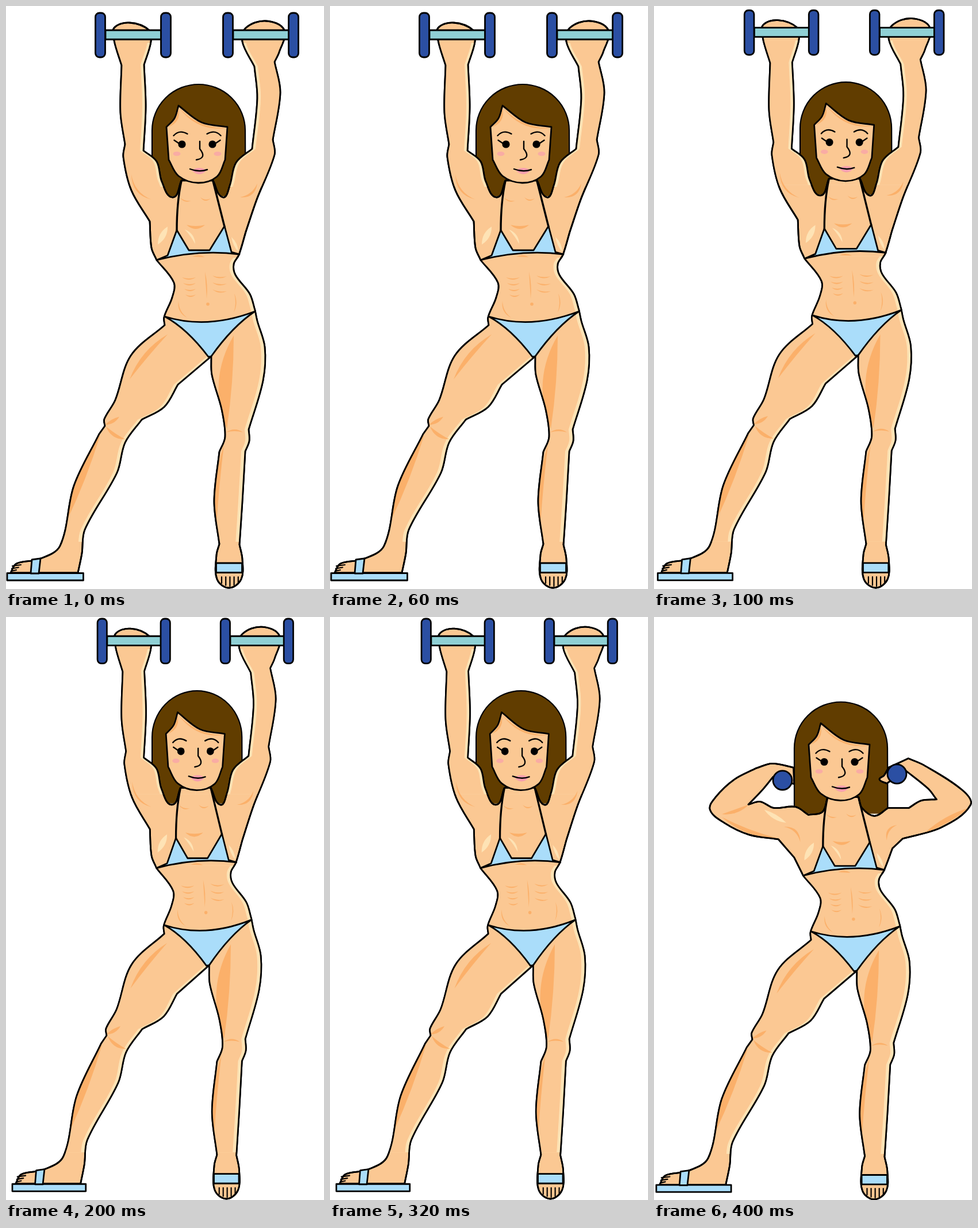
These frames come from a looping animation (553 px wide and 1012 px high, 0.5 s). An HTML page with a canvas:

```html
<!DOCTYPE html>
<html lang="en">
<head>
<meta charset="utf-8">
<title>Dumbbell press</title>
<style>
  html, body { margin: 0; width: 100%; height: 100%; overflow: hidden; background: #fff; }
  canvas { display: block; }
</style>
</head>
<body>
<canvas id="stage" width="553" height="1012"></canvas>
<script>
const c = document.getElementById('stage').getContext('2d');
const SKIN = '#fbc893', SHADE = '#fbb06a', LIGHT = '#fee3b5', HAIR = '#613d00',
      CLOTH = '#aaddfa', STEEL = '#8fd0d5', NAVY = '#2b4fa3', LINE = 2.8;

const unit = (a, b) => {
  const x = b[0] - a[0], y = b[1] - a[1], d = Math.hypot(x, y) || 1;
  return [x / d, y / d];
};

// Smooth curve through "x,y" points; a trailing * marks a corner.
function smooth(text) {
  const path = new Path2D();
  const p = text.split(' ').flatMap(s => {
    const q = s.split(',').map(parseFloat);
    return s.endsWith('*') ? [q, q] : [q];
  });
  path.moveTo(...p[0]);
  for (let i = 1; i < p.length; i++) {
    const a = p[i - 1], b = p[i], h = Math.hypot(b[0] - a[0], b[1] - a[1]) / 3;
    if (!h) continue;
    const u = unit(p[i - 2] || a, b), v = unit(a, p[i + 1] || b);
    path.bezierCurveTo(a[0] + u[0] * h, a[1] + u[1] * h, b[0] - v[0] * h, b[1] - v[1] * h, ...b);
  }
  return path;
}

function paint(path, fill, width = LINE) {
  if (typeof path === 'string') path = new Path2D(path);
  if (fill) { c.fillStyle = fill; c.fill(path); }
  if (width) { c.lineWidth = width; c.stroke(path); }
}

function oval(x, y, rx, ry, fill, width = 0) {
  const path = new Path2D();
  path.ellipse(x, y, rx, ry, 0, 0, 7);
  paint(path, fill, width);
}

function box(x, y, w, h, fill, r = 0) {
  const path = new Path2D();
  path.roundRect(x, y, w, h, r);
  paint(path, fill);
}

// Muscle mark between two points: a lens whose sides bulge by b1 and b2.
function leaf(color, x1, y1, x2, y2, b1, b2) {
  const [ux, uy] = unit([x1, y1], [x2, y2]), mx = (x1 + x2) / 2, my = (y1 + y2) / 2;
  const bend = b => `${mx + 2 * b * uy} ${my - 2 * b * ux}`;
  paint(`M${x1} ${y1}Q${bend(b1)} ${x2} ${y2}Q${bend(b2)} ${x1} ${y1}Z`, color, 0);
}

// Body outline: upper half per pose, then waist and legs back to the start.
const LOWER = ' 405,432 396,448 399,467 424,500 433,528* 437,547 450,592 447,650 422,735* 423,755 416,773* 411,860 406,935* 411,960 409,995 388,1010 367,995 366,953 371,934* 362,860 371,774* 381,748 375,700 358,640 357,608* 299,657* 275,696 236,718* 207,758 193,810 137,909 132,950 125,984* 8,984* 18,968 58,960 94,937 118,833 162,743* 172,729* 171,717 190,684 217,607 276,554* 275,540 289,506 292,480 262,441*';
const RAISED = smooth('262,441* 253,420 250,374* 218,320 204,262 207,240* 199,185 201,103* 188,60 188,38 215,29 249,42 252,62 240,102* 243,175 239,251* 262,270 271,305 290,332 305,303* 360,303* 377,332 389,312 400,272 428,248* 437,160 432,105* 411,62 417,38 452,26 484,42 475,80 467,97* 477,150 464,232* 467,258 436,336 417,392*' + LOWER);
const FLEXED = smooth('262,441* 246,409* 218,377* 166,369 122,348 97,325 107,303 140,272 179,252* 207,244 245,251* 246,280* 209,267* 191,289 165,316* 186,311 210,322 248,320 271,334* 296,329 305,303* 360,303* 366,322 388,336 412,322* 449,322* 471,309 498,307* 483,288 443,256* 410,279* 397,272 405,265 413,251* 448,235* 476,247 544,291 558,317 507,356 438,376* 420,393*' + LOWER);

// Leaves a light rim where the outline, moved sideways, no longer covers itself.
function rim(outline, shift, x, y, w, h) {
  c.save();
  c.beginPath();
  c.rect(x, y, w, h);
  c.clip();
  c.clip(outline);
  paint(outline, LIGHT, 0);
  c.translate(shift, 0);
  paint(outline, SKIN, 0);
  c.restore();
}

function muscles() {
  for (const m of [
    [281, 570, 215, 648, -9, -1], [164, 744, 106, 893, -11, 3],
    [396, 572, 384, 734, -20, 3], [379, 762, 366, 900, -8, -1],
    [172, 727, 197, 713, 2, -4], [174, 730, 207, 752, -1, -7], [383, 740, 412, 740, 5, 2],
    [314, 380, 346, 380, -2, -7], [303, 333, 322, 338, -4, -2], [338, 332, 356, 334, -5, -3],
    [324, 435, 346, 436, 3, 0], [346, 461, 349, 508, 2, 0],
    [300, 512, 315, 541, -6, -4], [397, 499, 396, 532, 4, 2.5]
  ]) leaf(SHADE, ...m);
  for (let i = 0; i < 4; i++) {
    leaf(SHADE, 306 + 2 * i, 471 + 10 * i, 330, 471 + 10 * i, -4, -2);
    if (i < 3) leaf(SHADE, 359, 468 + 12 * i, 384, 469 + 13 * i, -4, -2);
  }
  oval(351, 517.5, 2.8, 2.8, SHADE);
  leaf(LIGHT, 281, 383, 264, 414, -5, 5);
  leaf(LIGHT, 392, 401, 404, 427, 3, -2);
  leaf(LIGHT, 311, 388, 329, 413, 5, 1);
}

function clothes() {
  paint('M276 539Q350 562 433 530Q394 556 357 608L352 609Q315 560 276 539Z', CLOTH);
  paint('M262 441L281 433L297 389L318 424H354L380 382L392 427L406 431Q335 422 262 441Z', CLOTH);
  paint('M297 390Q297 340 305 304M380 383L360 304', null, 3.4);
  box(2, 984.5, 132.5, 12.5, CLOTH);
  paint('M45 961L60 959L57 985H43Z', CLOTH);
  box(365.5, 967, 45, 16.5, CLOTH);
  for (let i = 0; i < 5; i++) {
    paint(`M${375 + 7.2 * i} 991V${1002 + 5 * Math.sin(i * Math.PI / 4)}`, null, 2.2);
    if (i < 3) paint(`M${11 - i} ${972 + 4.5 * i}l${15 - 3 * i} -2`, null, 2.2);
  }
}

function body(outline) {
  paint(outline, SKIN);
  rim(outline, -7, 0, 437, 553, 493);
  if (outline === RAISED) {
    rim(outline, -6, 0, 64, 332, 250);
    rim(outline, 6, 332, 64, 221, 250);
    leaf(SHADE, 218, 292, 253, 336, -11, -8);
    leaf(SHADE, 437, 308, 407, 332, 9, 5);
  } else {
    leaf(LIGHT, 193, 325, 232, 348, 3, -5);
    leaf(SHADE, 118, 333, 166, 316, 0, -6);
    leaf(SHADE, 118, 338, 216, 375, -10, -3);
    leaf(SHADE, 228, 355, 257, 382, 10, 6);
    leaf(SHADE, 428, 352, 410, 379, -9, -5);
    leaf(SHADE, 555, 322, 478, 365, 4, -5);
  }
  muscles();
  paint(outline, null);
  clothes();
}

function hair() {
  const path = new Path2D('M254 330V215');
  path.ellipse(335, 216, 81, 80, 0, Math.PI, 0);
  path.lineTo(416.5, 330);
  paint(path, HAIR, 2.2);
}

function face() {
  paint(smooth('300,173* 293,195 279,210* 283,267* 300,295 334,307 367,296 381,267* 385,210* 340,202 300,173*'), SKIN);
  leaf(SHADE, 301, 177, 384, 212, -10, -13);
  leaf(SHADE, 300, 178, 282, 210, 4, 8);
  for (const side of [-1, 1]) {
    c.save();
    c.translate(332.5, 0);
    c.scale(side, 1);
    oval(26.5, 240, 6.6, 6.6, '#000');
    oval(35.5, 256.5, 6.5, 3.8, '#f9aca4');
    paint('M17 222Q31 214 41 225M40 233L31 239', null, 2.4);
    c.restore();
  }
  paint('M337 235V248Q350 264 331 267', null, 2.4);
  leaf('#f79fae', 323, 285, 349, 285, 4, -7);
  paint('M320 283Q336 289 350 284', null, 2.4);
}

function dumbbells() {
  for (const x of [155.5, 377.5]) {
    box(x + 17.5, 42, 97, 16, STEEL);
    for (const plate of [x, x + 114]) box(plate, 12, 17, 77, NAVY, 7);
  }
}

// k runs from 0 to 1 as the raised figure stretches upwards.
function press(k) {
  c.setTransform(1 - .0355 * k, 0, 0, 1 + .009 * k, 9.07 * k, -9.1 * k);
  hair();
  body(RAISED);
  face();
  dumbbells();
}

function flex() {
  const head = [1, 0, 0, 1, -10, 11.5];
  c.setTransform(...head);
  hair();
  c.setTransform(.9826, 0, 0, .9877, 2, 13.4);
  body(FLEXED);
  oval(225.4, 273.5, 16.8, 16.8, NAVY, LINE);
  oval(427.9, 262.3, 16.8, 16.8, NAVY, LINE);
  c.setTransform(...head);
  face();
}

function draw() {
  const t = performance.now() % 500;
  c.resetTransform();
  c.fillStyle = '#fff';
  c.fillRect(0, 0, 553, 1012);
  c.lineJoin = c.lineCap = 'round';
  if (t < 400) press(Math.min(2, Math.floor(t / 100)) / 2);
  else flex();
  requestAnimationFrame(draw);
}
draw();
</script>
</body>
</html>
```
